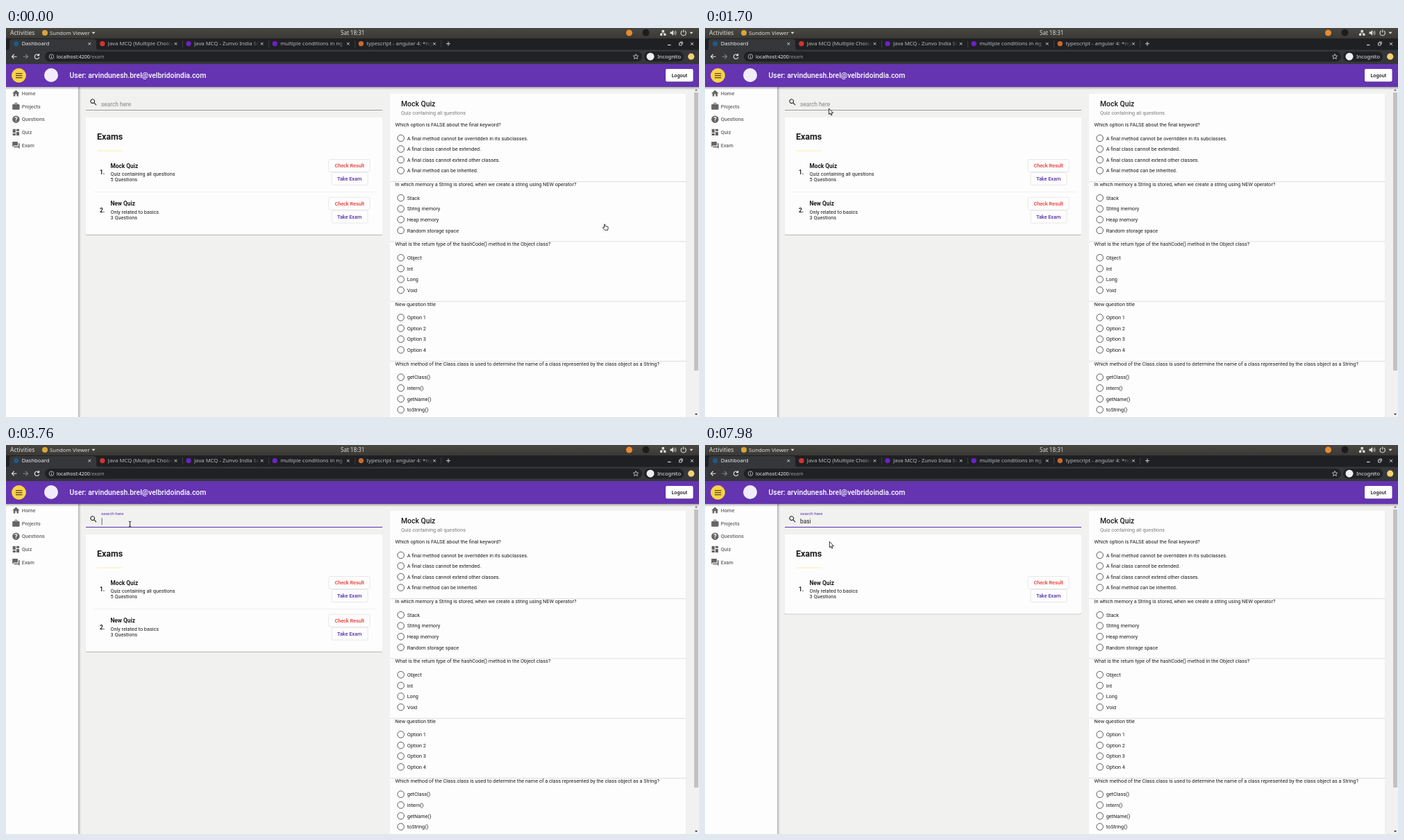
Recreate the animation shown at these times as an HTML page. Size 998x561 px, loop 8000 ms.

```html
<!DOCTYPE html>
<html lang="en">
<head>
<meta charset="utf-8">
<title>Exam dashboard</title>
<style>
  html, body { margin: 0; width: 100%; height: 100%; overflow: hidden; background: #f1f1f0; }
  svg { display: block; width: 100%; height: 100%; font: 7.28px Roboto, sans-serif; }
  text { white-space: pre; }
  .ui { font-family: "Noto Sans", "Open Sans", sans-serif; }
  .m { font-weight: 500; }
  .b { font-weight: 700; }
</style>
</head>
<body>
<svg id="stage" viewBox="0 0 998 561" preserveAspectRatio="none"></svg>
<script>
const LOOP = 8000, ROW_HEIGHT = 54.7, PURPLE = '#5b35ad';

// SVG markup helpers
const rect = (x, y, w, h, fill, more = '') =>
  `<rect x="${x}" y="${y}" width="${w}" height="${h}" fill="${fill}" ${more}/>`;
const circle = (x, y, r, fill, more = '') =>
  `<circle cx="${x}" cy="${y}" r="${r}" fill="${fill}" ${more}/>`;
const stroke = (d, color, width = 1, more = '') =>
  `<path d="${d}" fill="none" stroke="${color}" stroke-width="${width}" ${more}/>`;
const shape = (d, fill, more = '') => `<path d="${d}" fill="${fill}" fill-rule="evenodd" ${more}/>`;
const text = (x, y, str, fill = '#1c1c1c', size = 7.28, cls = '', more = '') =>
  `<text x="${x}" y="${y}" fill="${fill}" class="${cls}" style="font-size:${size}px" ${more}>${str}</text>`;
const icon = (cx, cy, d, fill) =>
  shape(d, fill, `transform="translate(${cx - 6.24} ${cy - 6.24}) scale(.52)"`);
const cross = (x, y, r, color) =>
  stroke(`M${x - r} ${y - r}l${2 * r} ${2 * r}m0 ${-2 * r}l${-2 * r} ${2 * r}`, color, 1);

function desktopBar() {
  const light = '#dededb';
  return rect(0, 0, 998, 15, 'url(#panel)') +
    text(6, 9.8, 'Activities', light, 8.5, 'ui') +
    circle(56, 7, 4, '#d9a53a') +
    text(63, 9.8, 'Sundom Viewer', light, 7.85, 'ui') +
    shape('M123.5 5.8h5l-2.5 3z', light) +
    text(482, 9.8, 'Sat 18:31', light, 8, 'ui') +
    circle(897.5, 7, 4.5, '#ea8a2f') + circle(921.5, 6.8, 5, '#1f1b1d') +
    rect(944.5, 3, 3.4, 3, light) + rect(942, 8, 3.2, 3, light) + rect(947.2, 8, 3.2, 3, light) +
    stroke('M946.2 6v1.2m-2.6 1v-1h5.2v1', light, .7) +
    shape('M956.5 5.4h2l2.6-2.4v8l-2.6-2.4h-2z', light) +
    stroke('M962.4 5q1.4 2 0 4m1.5-5.4q2.4 3.4 0 6.8', light, .8) +
    stroke('M973.7 4.2a3.7 3.7 0 1 0 4 0M975.7 2.5v4', light, 1.1) +
    shape('M984.5 5.8h5l-2.5 3z', light);
}

function browserBar() {
  const tabs = [
    ['Dashboard', '#1d5a86'], ['Java MCQ (Multiple Choice', '#d8322c'],
    ['Java MCQ - Zunvo India Se', '#6c22c8'], ['multiple conditions in ng', '#6c22c8'],
    ['typescript - angular 4: *ng', '#c96b2b']
  ];
  let out = rect(0, 15, 998, 17, '#1f2023') +
    shape('M1 32q4 0 4-4v-8q0-4 4-4h117q4 0 4 4v8q0 4 4 4z', '#36373a');
  tabs.forEach(([name, color], i) => {
    const x = 22.7 + i * 124.15;
    out += circle(x - 8, 22.6, 3.7, color) +
      `<clipPath id="tab${i}">${rect(x, 16, 93, 15, '#000')}</clipPath>` +
      `<g clip-path="url(#tab${i})">` + text(x, 25.2, name, i ? '#b9babd' : '#eee', 7.7, 'ui') + '</g>' +
      cross(x + 97.6, 22.7, 1.8, '#d5d5d5');
    if (i) out += rect(x + 83, 17, 10, 14, 'url(#fade)') + rect(x + 107.3, 18, .6, 10, '#505156');
  });
  return out +
    stroke('M634 22.7h6m-3-3v6', '#d0d0d0', 1) +
    stroke('M953 24.5h4.5', '#ddd', 1.2) +
    stroke('M969.5 21.5h3.5v3.5h-3.5zm1.2-1.5h3.6v3.6', '#ddd', .9) + cross(988, 22.8, 2, '#ddd') +
    rect(0, 31.5, 998, 20.5, '#36373a') +
    rect(56, 34, 860, 14.6, '#202125', 'rx="7.3"') +
    stroke('M15.5 41.2h-7m3.2-3.2l-3.2 3.2l3.2 3.2', '#e8e8e8', 1.1) +
    stroke('M24.5 41.2h7m-3.2-3.2l3.2 3.2l-3.2 3.2', '#85868a', 1.1) +
    stroke('M47 39a3.3 3.3 0 1 0 .8 3M47.6 37v2.6h-2.6', '#e8e8e8', 1.1) +
    circle(65.5, 41.2, 3.3, 'none', 'stroke="#c8c8c8" stroke-width=".8"') +
    stroke('M65.5 39.3v.8m0 .8v2.3', '#c8c8c8', .9) +
    text(73, 43.8, 'localhost:4200<tspan fill="#96979b">/exam</tspan>', '#eee', 7.05, 'ui') +
    stroke('M907 37.5l1.1 2.5 2.6.2-2 1.8.6 2.6-2.3-1.4-2.3 1.4.6-2.6-2-1.8 2.6-.2z', '#d8d8d8', .8) +
    rect(919, 34, 57, 14.6, '#202125', 'rx="7.3"') +
    circle(928, 41.2, 5.5, '#eeeeee') + text(938, 43.9, 'Incognito', '#eee', 7.6, 'ui') +
    circle(986.7, 41.2, 4.6, '#f4d172');
}

function appHeader() {
  return rect(0, 85, 998, 4, 'url(#shadow)') + rect(0, 52, 998, 33, '#6534b1') +
    circle(18.5, 68.5, 10.4, '#fad24a', 'filter="url(#cardShadow)"') +
    stroke('M14 65.7h9.4m-9.4 3h9.4m-9.4 3h9.4', '#2b2415', 1.1) +
    circle(65, 68, 10, '#f2ecfa') +
    text(91.5, 72, 'User: arvindunesh.brel@velbridoindia.com', '#fff', 10.4, 'm') +
    rect(950, 59, 39.5, 18.2, '#fff', 'rx="2" filter="url(#cardShadow)"') +
    text(969.8, 71, 'Logout', '#1c1c1c', 7.28, 'm', 'text-anchor="middle"');
}

function sidebar() {
  const grey = '#666';
  const items = [
    ['Home', 'M10 20v-6h4v6h5v-8h3L12 3 2 12h3v8z'],
    ['Projects', 'M20 6h-4V4q0-2-2-2h-4q-2 0-2 2v2H4q-2 0-2 2v11q0 2 2 2h16q2 0 2-2V8q0-2-2-2zm-6 0h-4V4h4z'],
    ['Questions', 'M12 2a10 10 0 1 0 .1 0z'],
    ['Quiz', 'M3 13h8V3H3zm0 8h8v-6H3zm10 0h8V11h-8zm0-18v6h8V3z'],
    ['Exam', 'M21 6h-2v9H6v2q0 1 1 1h11l4 4V7q0-1-1-1zm-4 6V3q0-1-1-1H3q-1 0-1 1v14l4-4h10q1 0 1-1z']
  ];
  return rect(104, 85, 4, 476, 'url(#sideShadow)') + rect(0, 85, 104, 476, '#fdfdfd') +
    items.map(([name, d], i) => {
      const y = 94.3 + i * 18.7;
      return icon(14.4, y, d, grey) + text(22.8, y + 2.6, name, grey, 7.28, 'm') +
        (name === 'Questions' ? text(14.4, y + 3.2, '?', '#fff', 9, 'b', 'text-anchor="middle"') : '');
    }).join('');
}

function examRow(id, number, name, detail, count) {
  const button = (x, y, w, label, color) =>
    rect(x, y, w, 18, 'none', 'rx="2" stroke="#dedede" stroke-width=".7"') +
    text(494.7, y + 11.9, label, color, 7.28, 'm', 'text-anchor="middle"');
  return `<g id="${id}">` +
    text(135, 211, number, '#1c1c1c', 8.32, 'b', `id="${id}Number"`) +
    text(150.5, 201.6, name, '#1c1c1c', 8.32, 'b') +
    text(150.5, 213, detail) + text(150.5, 221.2, count) +
    button(465, 189.5, 59, 'Check Result', '#e93a34') +
    button(469, 208.5, 52, 'Take Exam', '#5430a6') + '</g>';
}

function examList() {
  return icon(126, 107, 'M15.5 14h-.8l-.3-.3A6.5 6.5 0 1 0 13.7 14.4l.3.3v.8l5 5 1.5-1.5zm-6 0a4.5 4.5 0 1 1 0-9a4.5 4.5 0 0 1 0 9z', '#1c1c1c') +
    rect(115, 118.2, 427, .8, '#868686') +
    rect(115, 118, 427, 1.04, PURPLE, 'id="focusLine"') +
    text(0, 0, 'search here', '#858585', 8.32, '', 'id="label"') +
    text(137, 113.3, '', '#1c1c1c', 8.32, '', 'id="typed"') +
    rect(137.7, 105.3, .8, 10, '#444', 'id="caret"') +
    rect(114.5, 129, 427.5, 169, '#fdfdfd', 'id="card" rx="2" filter="url(#cardShadow)"') +
    text(131, 161, 'Exams', '#1c1c1c', 12.48, 'b') + rect(131, 176.6, 36.5, .9, '#f6ee9c') +
    rect(122, 181.5, 412.5, 54.5, '#f1f1f0', 'id="hover"') +
    rect(126, 236, 408, .6, '#e8e8e8', 'id="divider"') +
    examRow('mock', '1.', 'Mock Quiz', 'Quiz containing all questions', '5 Questions') +
    examRow('fresh', '2.', 'New Quiz', 'Only related to basics', '3 Questions');
}

function quizPanel() {
  const quiz = [
    ['Which option is FALSE about the final keyword?', 'A final method cannot be overridden in its subclasses.',
      'A final class cannot be extended.', 'A final class cannot extend other classes.', 'A final method can be inherited.'],
    ['In which memory a String is stored, when we create a string using NEW operator?',
      'Stack', 'String memory', 'Heap memory', 'Random storage space'],
    ['What is the return type of the hashCode() method in the Object class?', 'Object', 'Int', 'Long', 'Void'],
    ['New question title', 'Option 1', 'Option 2', 'Option 3', 'Option 4'],
    ['Which method of the Class.class is used to determine the name of a class represented by the class object as a String?',
      'getClass()', 'intern()', 'getName()', 'toString()']
  ];
  return rect(553, 95, 426.5, 480, '#fdfdfd', 'filter="url(#cardShadow)"') +
    text(569, 113.3, 'Mock Quiz', '#1c1c1c', 10.4, 'm') +
    text(569, 124.8, 'Quiz containing all questions', '#7b7b7b') +
    quiz.map(([question, ...options], i) => {
      const top = 139.3 + i * 86.2;
      return (i ? rect(553, top - 4.1, 426.5, .7, '#cfcfcf') : '') + text(560.6, top + 2.6, question) +
        options.map((option, j) => {
          const y = top + 19.6 + j * 15.6;
          return circle(568.6, y, 4.8, 'none', 'stroke="#5a5a5a" stroke-width="1"') + text(577.7, y + 2.6, option);
        }).join('');
    }).join('') +
    rect(990, 85, 8, 476, '#f1f1f1') + rect(991, 93, 6, 401, '#c1c1c1') +
    shape('M991.8 90.5h4.4l-2.2-2.6z', '#777') + shape('M991.8 556h4.4l-2.2 2.6z', '#444');
}

function pointers() {
  return '<g id="pointer">' +
    shape('M0 0v8.6l1.9-1.7 1.3 3 1.4-.6-1.3-2.9h2.7z', '#fff',
      'id="arrow" stroke="#1c1c1c" stroke-width=".9" stroke-linejoin="round"') +
    shape('M-1.5-3.6q.8-.8 1.5 0v2.4l3.2.6q1.2.3 1 1.5l-.6 3.5h-4.3l-2.9-3.3q0-1.2 1.2-.8l.9.7z', '#fff',
      'id="hand" stroke="#222" stroke-width=".9"') +
    stroke('M-1.8-3.8q1.8 0 1.8 1v6q0 1-1.8 1M1.8-3.8q-1.8 0-1.8 1v6q0 1 1.8 1', '#222', 1, 'id="beam"') + '</g>';
}

const defs = `<defs>
  <linearGradient id="panel" x2="0" y2="1"><stop stop-color="#484742"/><stop offset="1" stop-color="#3a3935"/></linearGradient>
  <linearGradient id="fade"><stop stop-color="#1f2023" stop-opacity="0"/><stop offset="1" stop-color="#1f2023"/></linearGradient>
  <linearGradient id="shadow" x2="0" y2="1"><stop stop-color="#000" stop-opacity=".3"/><stop offset="1" stop-color="#000" stop-opacity="0"/></linearGradient>
  <linearGradient id="sideShadow"><stop stop-color="#000" stop-opacity=".26"/><stop offset="1" stop-color="#000" stop-opacity="0"/></linearGradient>
  <filter id="cardShadow" x="-10%" y="-10%" width="120%" height="125%"><feDropShadow dx="0" dy=".8" stdDeviation=".7" flood-opacity=".3"/></filter>
</defs>`;

const stage = document.getElementById('stage');
stage.innerHTML = defs + rect(0, 0, 998, 561, '#f1f1f0') + examList() + quizPanel() + sidebar() +
  appHeader() + browserBar() + desktopBar() + pointers();

const el = {};
stage.querySelectorAll('[id]').forEach(node => el[node.id] = node);
const set = (id, name, value) => el[id].setAttribute(name, value);
const show = (id, on) => set(id, 'visibility', on ? 'visible' : 'hidden');

const clamp = v => Math.min(1, Math.max(0, v));
const smooth = v => v * v * (3 - 2 * v);
const progress = (t, from, to) => smooth(clamp((t - from) / (to - from)));
const mix = (a, b, p) => a + (b - a) * p;

// Pointer stops: time, x, y; it rests between equal positions.
const path = [
  [0, 863, 287], [20, 863, 287], [800, 183.5, 162], [880, 183.5, 162], [1520, 178.5, 116], [1760, 178.5, 116],
  [1900, 178.5, 114], [7150, 178.5, 114], [7750, 179.3, 139.3], [LOOP, 179.3, 139.3]
];
const FOCUS = 2500, FILTER = 4860;
const keys = [[4500, 'b'], [FILTER, 'ba'], [5220, 'bas'], [5560, 'basi']];

function pointerAt(t) {
  const i = path.findIndex((stop, n) => n && t <= stop[0]);
  const [a, b] = [path[i - 1], path[i]];
  const p = progress(t, a[0], b[0]);
  return [mix(a[1], b[1], p), mix(a[2], b[2], p)];
}

function caretOn(t, lastKey) {
  if (t < FOCUS + 60) return false;
  if (t > 5560) return t < 6680 || (t > 7180 && t < 7680);
  return (t - lastKey) % 1000 < 560;
}

function render(t) {
  const [x, y] = pointerAt(t);
  const beam = t > 1780 && y < 119, hand = x > 553;
  set('pointer', 'transform', `translate(${x} ${y})`);
  show('beam', beam);
  show('hand', hand);
  show('arrow', !beam && !hand);
  set('hover', 'opacity', x < 534 ? 1 - progress(t, 860, 980) : 0);

  const float = progress(t, FOCUS, FOCUS + 300);
  set('label', 'transform', `translate(137 ${mix(113.3, 100.7, float)}) scale(${mix(1, .75, float)})`);
  el.label.style.fill = t < FOCUS ? '#858585' : PURPLE;
  const half = t < FOCUS ? 0 : mix(.25, .5, float) * 427;
  set('focusLine', 'x', 328.5 - half);
  set('focusLine', 'width', half * 2);

  const [lastKey, typed] = keys.filter(key => key[0] <= t).pop() || [FOCUS + 60, ''];
  if (el.typed.textContent !== typed) el.typed.textContent = typed;
  set('caret', 'x', 137.7 + el.typed.getComputedTextLength());
  show('caret', caretOn(t, lastKey));

  const filtered = t >= FILTER;
  show('mock', !filtered);
  show('divider', !filtered);
  set('fresh', 'transform', `translate(0 ${filtered ? 0 : ROW_HEIGHT})`);
  el.freshNumber.textContent = filtered ? '1.' : '2.';
  set('card', 'height', 169 - (filtered ? ROW_HEIGHT : 0));
}

function tick() {
  render(performance.now() % LOOP);
  requestAnimationFrame(tick);
}
tick();
</script>
</body>
</html>
```
